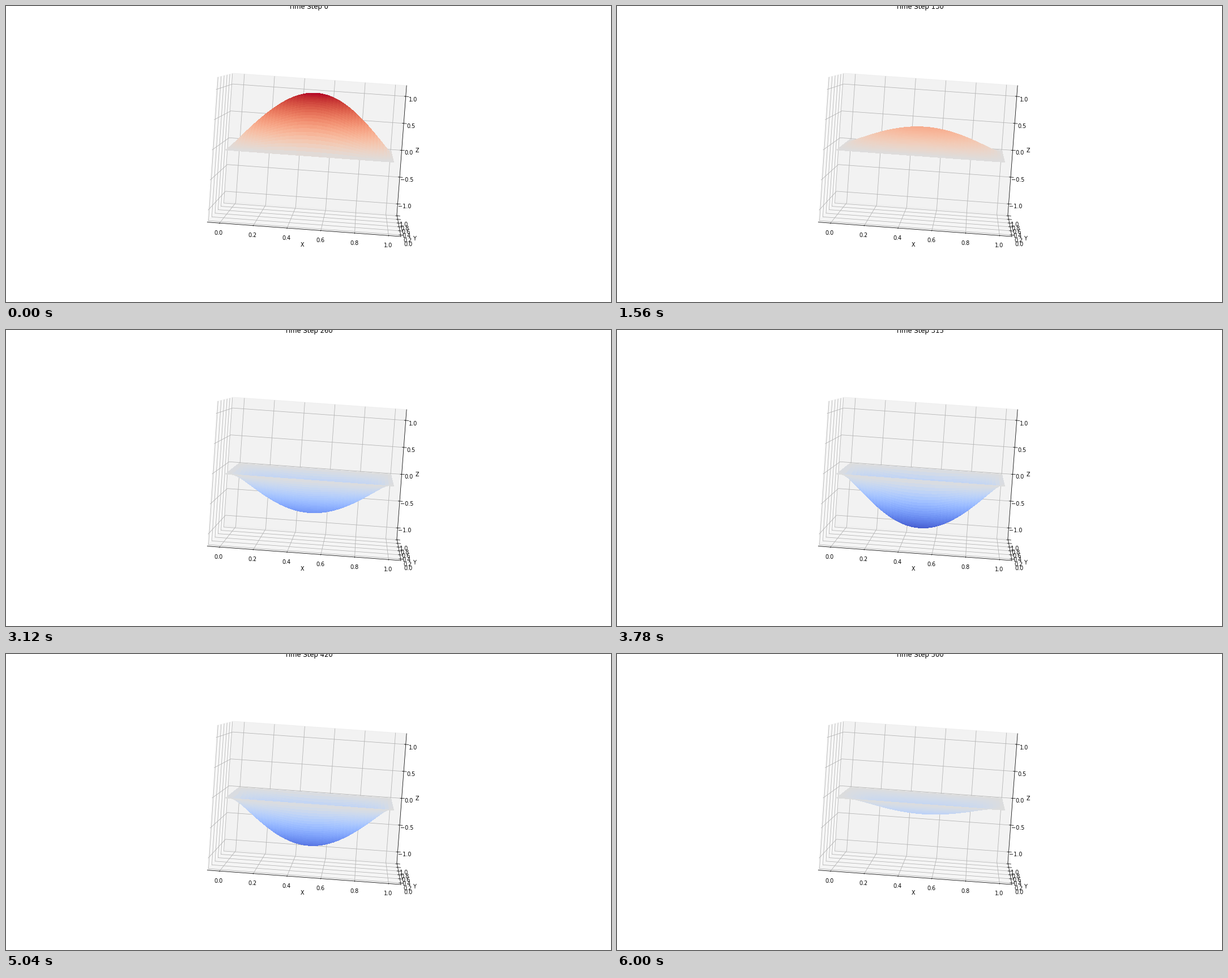
Animation of 1068x524 px, one loop 6.06 s. Source, as a matplotlib script:

```python
import numpy as np
import matplotlib.pyplot as plt
from matplotlib.animation import FuncAnimation

WIDTH, HEIGHT = 1068, 524
DPI = 69.53125
POINT = DPI / 72
FRAMES, INTERVAL = 101, 60
STEPS_PER_FRAME = 5
DT = 0.002
OMEGA = np.pi * np.sqrt(2)  # fundamental mode of a unit square membrane

plt.rcParams["font.family"] = "DejaVu Sans"
fig = plt.figure(figsize=(WIDTH / DPI, HEIGHT / DPI), dpi=DPI, facecolor="white")

# Square axes, centred, with a small margin above and below
pad = 10.8 * POINT
side = HEIGHT - 2 * pad
ax = fig.add_axes(
    [(WIDTH - side) / 2 / WIDTH, pad / HEIGHT, side / WIDTH, side / HEIGHT],
    projection="3d",
)
ax.view_init(elev=4.2, azim=-88.36, roll=-4.05)

title = fig.text(0.5, 1 - (pad - 6 * POINT) / HEIGHT, "", fontsize=12,
                 ha="center", va="baseline")

ax.set_xlabel("X")
ax.set_ylabel("Y")
ax.set_zlabel("Z")
unit_ticks = np.linspace(0, 1, 6)
ax.set_xticks(unit_ticks)
ax.set_yticks(unit_ticks)
ax.set_zticks(np.linspace(-1, 1, 5))
margin = 0.05 + 1.1 / 48
ax.set_xlim(-margin, 1 + margin)
ax.set_ylim(-margin, 1 + margin)
ax.set_zlim(-1.2, 1.2)

grid = np.linspace(0, 1, 50)
X, Y = np.meshgrid(grid, grid)
MODE = np.sin(np.pi * X) * np.sin(np.pi * Y)


def update(frame):
    step = frame * STEPS_PER_FRAME
    for old in list(ax.collections):
        old.remove()
    surface = ax.plot_surface(
        X, Y, MODE * np.cos(OMEGA * DT * step),
        cmap="coolwarm", vmin=-1, vmax=1, linewidth=0, antialiased=False,
    )
    title.set_text(f"Time Step {step}")
    return surface, title


anim = FuncAnimation(fig, update, frames=FRAMES, interval=INTERVAL,
                     repeat=True, repeat_delay=0, blit=False)
plt.show()
```
